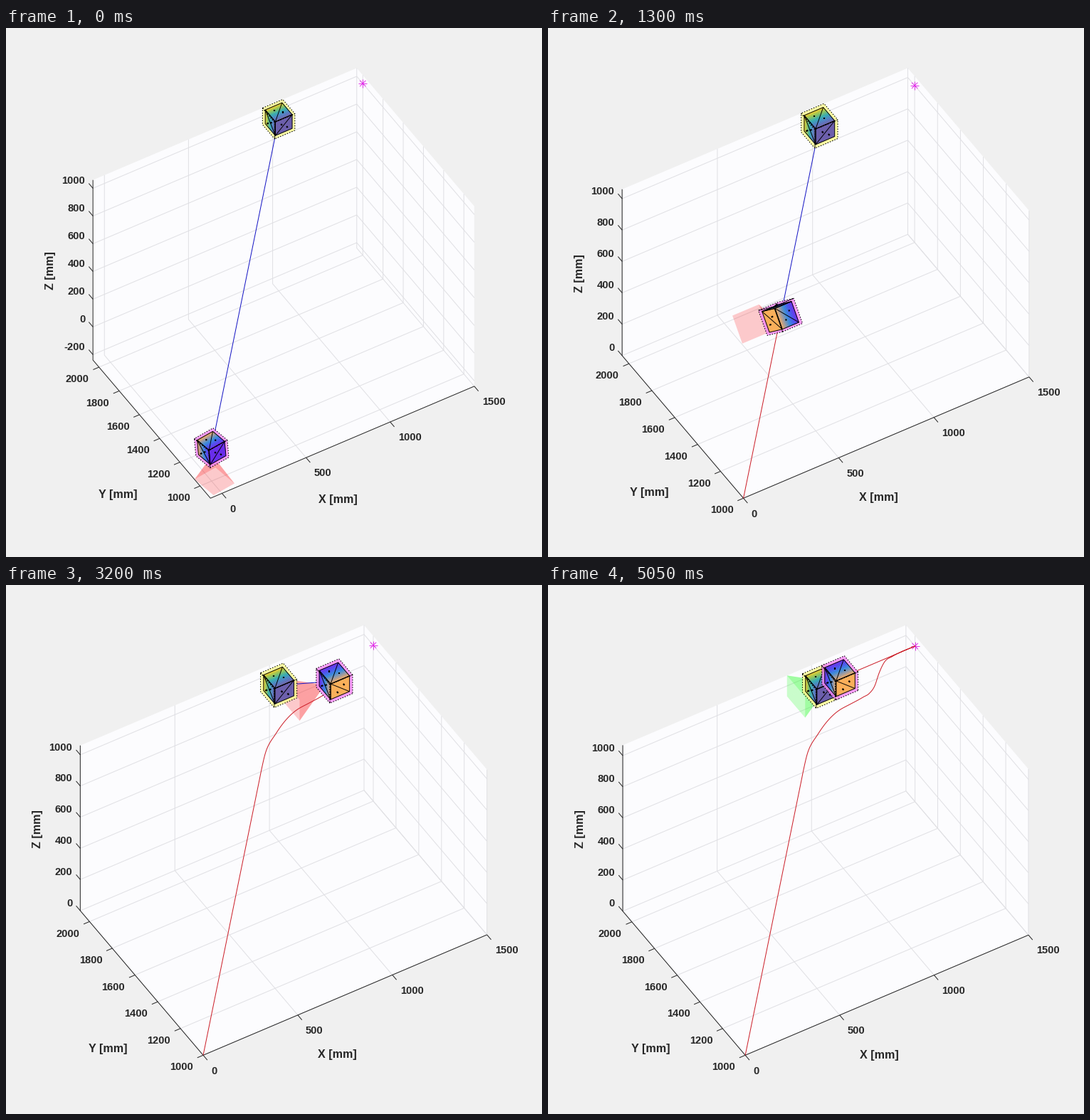
Write a matplotlib script that moves like this. It is 753x744 px and loops after 5100 ms.

```python
import numpy as np
import matplotlib.pyplot as plt
from matplotlib.animation import FuncAnimation
from matplotlib.collections import LineCollection, PolyCollection

W, H, DPI = 753, 744, 100
FRAMES, STEP = 102, 50
PX = 72 / DPI
plt.rcParams["font.family"] = "Liberation Sans"

# Orthographic view, azimuth -31 and elevation 45 degrees
AZ, EL = np.radians(31), np.radians(45)
RIGHT = np.array([np.cos(AZ), -np.sin(AZ), 0])
UP = np.array([np.sin(AZ) * np.sin(EL), np.cos(AZ) * np.sin(EL), np.cos(EL)])
EYE = np.cross(RIGHT, UP)
MID, TALL = (390, 358.8), 605

STATION = np.array([1000.0, 2000, 1000])
STAR = np.array([1500.0, 2000, 1000])
SIGNS = np.array([(i, j, k) for i in (-1, 1) for j in (-1, 1) for k in (-1, 1)])
CONE_LEN, CONE_C, CONE_E = 232, 80, 67
TURN = 3900

GRID, INK = "#e0e0e4", "#262626"
STATION_MAP = [(108, 95, 172), (75, 125, 200), (45, 170, 180), (140, 195, 90), (250, 205, 40)]
CHASER_MAP = [(105, 45, 235), (70, 85, 238), (50, 140, 220), (150, 155, 160), (250, 175, 90)]


def hermite(v, xs, ys):
    xs, ys = np.asarray(xs, float), np.asarray(ys, float)
    m = np.gradient(ys, xs)
    v = np.clip(v, xs[0], xs[-1])
    i = np.clip(np.searchsorted(xs, v, side="right") - 1, 0, len(xs) - 2)
    h = xs[i + 1] - xs[i]
    u = (v - xs[i]) / h
    return ((1 + 2 * u) * (1 - u) ** 2 * ys[i] + u * (1 - u) ** 2 * h * m[i]
            + u * u * (3 - 2 * u) * ys[i + 1] + u * u * (u - 1) * h * m[i + 1])


# Chaser travel: x over time, then y and z shortfall over x
TIMES = [0, 650, 1150, 1950, 2250, 2650, 2900, 3050, 3250, 3400, 3650, 3900, 4100, 4350, 5050]
TRAVEL = [0, 230, 428, 752, 895, 1108, 1212, 1265, 1305, 1340, 1425, 1499, 1478, 1405, 1102]
KNOTS_Y = ([0, 300, 600, 740, 780, 821, 926, 1013, 1088, 1151, 1210, 1258, 1500],
           [1000, 700, 400, 260, 220, 180, 100, 48, 18, 8, 3, 0, 0])
KNOTS_Z = ([0, 300, 600, 740, 780, 821, 926, 1013, 1225, 1258, 1288, 1310, 1337, 1382, 1425, 1500],
           [1000, 700, 400, 260, 220, 190, 184, 182, 184, 179, 145, 79, 24, 6, 0, 0])


def position(t):
    t = np.asarray(t, float)
    x = hermite(t, TIMES, TRAVEL)
    off = t < TURN
    return np.stack([x, 2000 - hermite(x, *KNOTS_Y) * off,
                     1000 - hermite(x, *KNOTS_Z) * off], axis=-1)


def basis(c, d):
    """Body axes as columns: colour axis, docking axis, side axis."""
    d = np.array(d, float) / np.linalg.norm(d)
    c = np.array(c, float) - np.dot(c, d) * d
    c /= np.linalg.norm(c)
    return np.column_stack([c, d, np.cross(c, d)])


STATION_R = basis((0, -1, 0), (0, 0, -1))
POSES = [(0, basis((.11, -.99, 0), (.035, -.07, -1))),
         (650, basis((.54, -.75, .37), (.57, 0, -.82))),
         (1950, basis((.15, .98, -.09), (-.986, .144, -.075))),
         (2500, basis((0, 1, 0), (-1, 0, 0)))]


def slerp(a, b, u):
    m = b @ a.T
    ang = np.arccos(np.clip((np.trace(m) - 1) / 2, -1, 1))
    n = np.array([m[2, 1] - m[1, 2], m[0, 2] - m[2, 0], m[1, 0] - m[0, 1]])
    n /= np.linalg.norm(n)
    k = np.array([[0, -n[2], n[1]], [n[2], 0, -n[0]], [-n[1], n[0], 0]])
    th = ang * u
    return (np.eye(3) + np.sin(th) * k + (1 - np.cos(th)) * k @ k) @ a


def attitude(t):
    for (t0, a), (t1, b) in zip(POSES, POSES[1:]):
        if t < t1:
            return slerp(a, b, (t - t0) / (t1 - t0))
    return POSES[-1][1]


def projector(lo, hi):
    box = np.where(SIGNS > 0, hi, lo)
    r, u = box @ RIGHT, box @ UP
    s = TALL / np.ptp(u)
    mr, mu = (r.min() + r.max()) / 2, (u.min() + u.max()) / 2

    def proj(p):
        p = np.asarray(p, float)
        return np.stack([MID[0] + s * (p @ RIGHT - mr), MID[1] - s * (p @ UP - mu)], axis=-1)
    return proj, s


fig = plt.figure(figsize=(W / DPI, H / DPI), dpi=DPI, facecolor="#f0f0f0")
ax = fig.add_axes([0, 0, 1, 1])
ax.set_xlim(0, W)
ax.set_ylim(H, 0)
ax.axis("off")


def segs(lines, color, width=1.0, style="solid"):
    ax.add_collection(LineCollection(lines, colors=color, linewidths=width * PX,
                                     linestyles=style, zorder=1))


def polys(shapes, color, edge="none", width=0.0):
    ax.add_collection(PolyCollection(shapes, facecolors=color, edgecolors=edge,
                                     linewidths=width, zorder=1))


def text(x, y, s, size=14.67, ha="center", rot=0):
    ax.text(x, y, s, fontsize=size * PX, fontweight="bold", color=INK, ha=ha,
            va="baseline", rotation=rot, rotation_mode="anchor", zorder=2)


def draw_axes(lo, hi, proj, s):
    (x0, y0, z0), (x1, y1, z1) = lo, hi
    polys([proj([(x0, y0, z0), (x1, y0, z0), (x1, y0, z1),
                 (x1, y1, z1), (x0, y1, z1), (x0, y1, z0)])], "#fcfcfe")

    def ticks(a, b, step):
        return range(int(np.ceil(a / step - 1e-6)) * step, int(np.floor(b / step + 1e-6)) * step + 1, step)

    tx, ty, tz = ticks(x0, x1, 500), ticks(y0, y1, 200), ticks(z0, z1, 200)
    grid = [[(x, y0, z0), (x, y1, z0), (x, y1, z1)] for x in tx]
    grid += [[(x0, y, z0), (x1, y, z0), (x1, y, z1)] for y in ty]
    grid += [[(x0, y1, z), (x1, y1, z), (x1, y0, z)] for z in tz]
    segs([proj(g) for g in grid], GRID)
    segs([proj([(x1, y0, z0), (x0, y0, z0), (x0, y1, z0), (x0, y1, z1)])], INK)

    back = np.array([-RIGHT[1], UP[1]]) / np.hypot(RIGHT[1], UP[1])
    left = np.array([-RIGHT[0], UP[0]]) / np.hypot(RIGHT[0], UP[0])
    marks = []
    for vals, point, way, dx, dy, ha in (
            (tx, lambda v: (v, y0, z0), back, 11, 21, "left"),
            (ty, lambda v: (x0, v, z0), left, -14, 16, "right"),
            (tz, lambda v: (x0, y1, v), -back, -11, -11.5, "right")):
        for v in vals:
            p = proj(point(v))
            marks.append([p, p + 9 * way])
            text(p[0] + dx, p[1] + dy + 5.2, str(v), ha=ha)
    segs(marks, INK)

    mx = proj(((x0 + x1) / 2, y0, z0))
    my = proj((x0, (y0 + y1) / 2, z0))
    mz = proj((x0, y1, (z0 + z1) / 2))
    text(mx[0] + np.interp(s, [.277, .31], [-6, -11]),
         mx[1] + np.interp(s, [.277, .31], [80, 83]) + 5.8, "X [mm]", 16.1)
    text(my[0] - 47, my[1] + 97.3, "Y [mm]", 16.1)
    text(mz[0] - 55, mz[1] + 1, "Z [mm]", 16.1, rot=90)


def shade(stops, v):
    at = np.linspace(0, 1, len(stops))
    return [np.interp(v, at, ch) / 255 for ch in zip(*stops)]


def draw_cube(proj, center, R, stops, pad):
    pads, fills, colors, edges, dots, marks = [], [], [], [], [], []

    def world(b):
        return proj(center + np.asarray(b, float) @ R.T)

    for axis in range(3):
        j, k = [a for a in range(3) if a != axis]
        for sign in (-1, 1):
            if sign * (R[:, axis] @ EYE) <= 0:
                continue

            def pt(u, v):
                p = np.zeros(3)
                p[axis], p[j], p[k] = sign, u, v
                return p

            ring = np.array([pt(-1, -1), pt(1, -1), pt(1, 1), pt(-1, 1)])
            pads.append(world(60 * ring))
            dots.append(world(60 * ring[[0, 1, 2, 3, 0]]))
            edges.append(world(50 * ring[[0, 1, 2, 3, 0]]))
            if axis == 0:
                fills.append(world(50 * ring))
                colors.append(shade(stops, (1 - sign) / 2))
            else:
                cut = np.linspace(-1, 1, 19)
                for a, b in zip(cut, cut[1:]):
                    fills.append(world(50 * np.array([pt(a, -1), pt(b, -1), pt(b, 1), pt(a, 1)])))
                    colors.append(shade(stops, (1 - (a + b) / 2) / 2))
            parity = 1 if axis == 1 else -1
            diag = [i for i in range(4) if np.prod(ring[i]) == parity]
            edges.append(world(50 * ring[diag]))
            for i in set(range(4)) - set(diag):
                mid = 50 * (ring[diag].sum(axis=0) + ring[i]) / 3
                tip = mid.copy()
                tip[axis] += 11 * sign
                marks.append(world([mid, tip]))
    polys(pads, [pad])
    polys(fills, colors, colors, .3)
    segs(edges, "black", .95)
    segs(marks, "black", 2.2)
    segs(dots, "black", 1.1, (0, (1.3, 1.9)))


def draw(i):
    for art in list(ax.collections) + list(ax.texts):
        art.remove()
    t = i * STEP
    pos, R = position(t), attitude(t)
    c, d, e = R.T
    trail = position(np.linspace(0, t, 4 * i + 2))
    apex = pos + 50 * d
    base = [pos + CONE_LEN * d + CONE_C * a * c + CONE_E * b * e
            for a, b in ((-1, -1), (1, -1), (1, 1), (-1, 1))]

    pts = np.vstack([trail, base, [STAR], STATION + 60 * SIGNS, pos + 60 * SIGNS @ R.T])
    lo, hi = pts.min(axis=0), pts.max(axis=0)
    proj, s = projector(lo, hi)
    draw_axes(lo, hi, proj, s)

    star = proj(STAR)
    rays = [(6, 0), (0, 6), (4.2, 4.2), (4.2, -4.2)]
    segs([[star - r, star + r] for r in np.array(rays)], "#e020e8", .9)

    # The view cone turns green once the station lies inside it
    gap = pos - STATION
    seen = gap[0] > 0 and np.hypot(gap[1], gap[2]) < .29 * gap[0]
    tint = (0, 1, 0, .2) if seen else (1, 0, 0, .2)
    for a, b in zip(base, base[1:] + base[:1]):
        polys([proj([apex, a, b])], [tint])

    segs([proj([pos, STATION])], "#1414c4")
    segs([proj(trail)], "#cc1e28")
    draw_cube(proj, STATION, STATION_R, STATION_MAP, (1, 1, .55, .8))
    draw_cube(proj, pos, R, CHASER_MAP, (.97, .52, .97, .8))
    return []


anim = FuncAnimation(fig, draw, frames=FRAMES, init_func=lambda: [], interval=STEP,
                     repeat=True, repeat_delay=0, blit=False)
plt.show()
```
